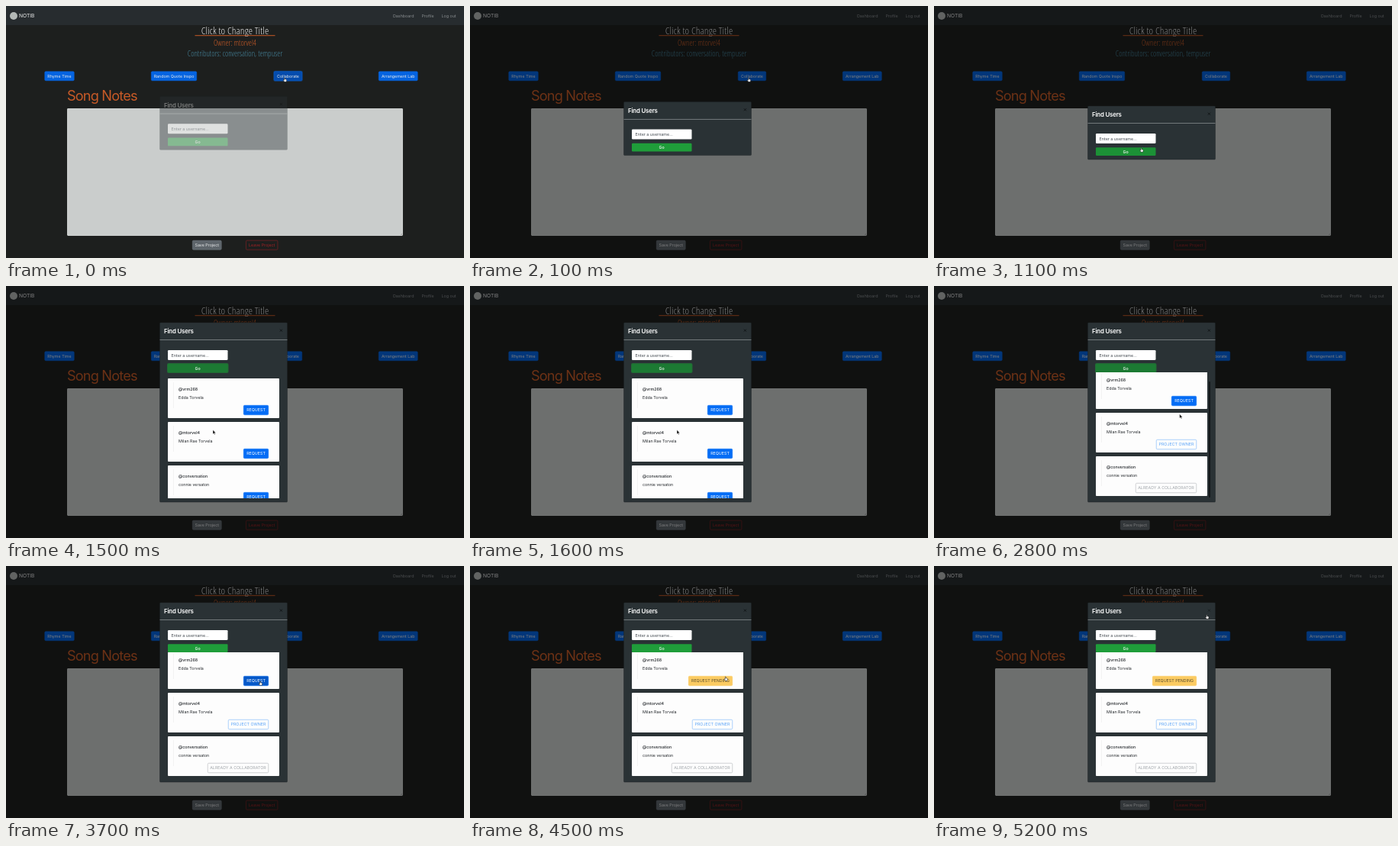
Animation of 600x330 px, one loop 5.4 s. Source, as an HTML page:

```html
<!DOCTYPE html>
<html lang="en">
<head>
<meta charset="utf-8">
<title>Find Users</title>
<style>
  html, body { margin: 0; width: 100%; height: 100%; overflow: hidden; background: #101111; }
  svg { display: block; }
  text { font-family: Inter, "Open Sans", sans-serif; white-space: pre; }
  .narrow { font-family: "Open Sans", "Noto Sans", sans-serif; font-stretch: 87.5%; font-weight: 350; }
</style>
</head>
<body>
<svg id="stage" width="600" height="330" viewBox="0 0 600 330"></svg>
<script>
const LOOP = 5400, STEP = 100;
const BLUE = '#056df5', GREEN = '#1f9d3a', PANEL = '#2a3235';

const rect = (x, y, w, h, fill, attrs = '') =>
  `<rect x="${x}" y="${y}" width="${w}" height="${h}" fill="${fill}" ${attrs}/>`;
const text = (x, y, label, fill, size = 5.34, attrs = '') =>
  `<text x="${x}" y="${y}" fill="${fill}" font-size="${size}" ${attrs}>${label}</text>`;
const centered = (x, y, label, fill, size, attrs = '') =>
  text(x, y, label, fill, size, `text-anchor="middle" ${attrs}`);
const button = (x, y, w, h, label, fill, color = '#fff', border = fill, id = '') =>
  `<g ${id && `id="${id}"`}>` +
  rect(x + .25, y + .25, w - .5, h - .5, fill, `rx="1.4" stroke="${border}" stroke-width=".5"`) +
  centered(x + w / 2, y + h / 2 + 1.95, label, color) + '</g>';

const page = () => [
  rect(0, 0, 600, 330, '#202221'),
  rect(0, 0, 600, 25, '#2a3033'),
  '<circle cx="10" cy="13" r="5" fill="#c3c8c6"/>',
  text(17, 15.3, 'NOTIB', '#fff', 6.68),
  text(507, 15, 'Dashboard', '#969a9d'),
  text(544.5, 15, 'Profile', '#969a9d'),
  text(570.5, 15, 'Log out', '#969a9d'),
  centered(300, 37.3, 'Click to Change Title', '#fff', 13.4, 'class="narrow" letter-spacing=".15"'),
  rect(247.5, 38.2, 105, 1, '#d9622a'),
  centered(300, 52, 'Owner: mtorvel4', '#d9622a', 10.4, 'class="narrow"'),
  centered(300, 66.3, 'Contributors: conversation, tempuser', '#4a8fa8', 10.4, 'class="narrow"'),
  button(50.5, 85.5, 39, 12.5, 'Rhyme Time', BLUE),
  button(190, 85.5, 60, 12.5, 'Random Quote Inspo', BLUE),
  rect(350.2, 84.7, 38.6, 14.1, '#163f70', 'rx="2.2" id="ring"'),
  button(351, 85.5, 37, 12.5, 'Collaborate', BLUE, '#fff', BLUE, 'collaborate'),
  button(488, 85.5, 51.5, 12.5, 'Arrangement Lab', BLUE),
  text(80, 124, 'Song Notes', '#d9622a', 18.2, 'letter-spacing="-.85"'),
  rect(80, 134, 440, 167, '#dcdfde', 'rx="1.4"'),
  '<path d="M517 300l2.2-2.2M518.4 300l.8-.8" stroke="#777" stroke-width=".4"/>',
  button(244, 306.8, 38.5, 12.6, 'Save Project', '#666e75', '#fff', '#7b838a'),
  button(314.2, 306.8, 42, 12.6, 'Leave Project', 'none', '#b02428', '#b02428'),
].join('');

const users = [
  ['@vrm268', 'Edda Torvela'],
  ['@mtorvel4', 'Milan Rae Torvela', 53, 'PROJECT OWNER', '#5ba5f8'],
  ['@conversation', 'connie versaton', 80, 'ALREADY A COLLABORATOR', '#a2a7ab'],
];
const card = ([handle, name, width, status, color], i) => {
  const y = 121 + 57 * i;
  return rect(212, y, 146, 52, '#fdfdfd', 'rx="1"') +
    rect(219.4, y + 5, .4, 34, '#e3e3e3') +
    text(226, y + 15.9, handle, '#212529', 5.34, 'font-weight="500"') +
    text(226, y + 27.4, name, '#212529') +
    button(311, y + 35, 33, 13, 'REQUEST', BLUE, '#fff', BLUE, 'request' + i) +
    (status
      ? `<g class="status">${button(344 - width, y + 35, width, 13, status, '#fdfdfd', color, color)}</g>`
      : button(286, y + 35, 58, 13, 'REQUEST PENDING', '#fbcb62', '#5a4d2c', '#fbcb62', 'pending'));
};

// Drawn at the expanded position; the collapsed dialog is shifted down.
const dialog = () => [
  rect(201.5, 48, 167, 235, PANEL, 'id="panel" rx="1" stroke="#1b2022" stroke-width=".4"'),
  text(207, 62.3, 'Find Users', '#fff', 7.9, 'font-weight="600" letter-spacing="-.2"'),
  '<path id="close" d="M358.9 56.7l3 3m0-3l-3 3" stroke="#0c0f10" stroke-width=".8"/>',
  rect(201.5, 70.4, 167, .6, '#a3a9ab'),
  rect(212, 84, 78.5, 13, '#fff', 'rx="1.3"'),
  text(216.5, 92.6, 'Enter a username...', '#454c52', 5.4),
  rect(211, 101, 80.5, 13, '#226a35', 'rx="2" id="goRing"'),
  rect(212, 102.2, 78.5, 10.8, GREEN, 'rx="1.2" id="go"'),
  centered(251.2, 109.5, 'Go', '#fff', 5.34, 'font-weight="500"'),
  `<svg id="results" x="201" y="113" width="168" height="165" viewBox="201 113 168 165">
    <g id="cards">${users.map(card).join('')}</g>
    ${rect(360, 125, 2, 152, '#14181a', 'rx="1" id="scrollbar"')}
  </svg>`,
].join('');

const pointers = `<g id="pointer">
  <path id="arrow" d="M0 0v5.4l1.3-1.2.9 2 .9-.4-.9-1.9h1.7z" fill="#000" stroke="#fff" stroke-width=".45"/>
  <path id="hand" d="M-.4 0q.5-.6.8 0l.2 1.8 1.8.5q.5.3.3 1l-.4 2h-2.6l-1.5-2.1q0-.7.8-.4l.5.5z"
    fill="#fff" stroke="#111" stroke-width=".5"/></g>`;

const stage = document.getElementById('stage');
stage.innerHTML = page() + rect(0, 0, 600, 330, '#000', 'id="backdrop"') +
  `<g id="dialog">${dialog()}</g>` + pointers;

const $ = id => document.getElementById(id);
const set = (id, name, value) => $(id).setAttribute(name, value);
const show = (id, on) => set(id, 'visibility', on ? 'inherit' : 'hidden');
const paint = (id, color) => { $(id).querySelector('rect').setAttribute('fill', color); };
const clamp = v => Math.max(0, Math.min(1, v));
const smooth = v => { v = clamp(v); return v * v * (3 - 2 * v); };

// time, x, y of the pointer tip
const path = [
  [0, 365, 94], [600, 365, 94], [1100, 271.5, 186], [1300, 271.5, 186], [1500, 271, 188.5],
  [2300, 271, 188.5], [2800, 321.7, 167.8], [3000, 329, 158], [3500, 333, 151],
  [4400, 333, 151], [5000, 357, 70.5], [5200, 357.3, 64],
];
const pointerAt = t => {
  const i = path.findIndex(p => p[0] > t);
  if (i < 0) return path[path.length - 1].slice(1);
  const [a, b] = [path[i - 1], path[i]];
  const k = smooth((t - a[0]) / (b[0] - a[0]));
  return [a[1] + (b[1] - a[1]) * k, a[2] + (b[2] - a[2]) * k];
};

function draw(t) {
  const drop = -16.7 * (1 - clamp((t + 45) / 300)) ** 1.7;
  const expanded = t >= 1400, loaded = t >= 1700, sent = t >= 3800;

  set('backdrop', 'opacity', clamp((t + 20) / 120) / 2);
  set('dialog', 'opacity', clamp((t + 60) / 150));
  set('dialog', 'transform', `translate(0 ${expanded ? 0 : 83 + drop})`);
  set('panel', 'height', expanded ? 235 : 70);
  show('results', expanded);

  show('ring', t < 100);
  paint('collaborate', t < 100 ? '#0553bd' : BLUE);
  const focused = t >= 1300 && t < 3700;
  show('goRing', focused);
  set('go', 'fill', focused ? '#1c7a33' : t >= 1000 && t < 1300 ? '#1c9136' : GREEN);

  set('cards', 'transform', `translate(0 ${-12 * smooth((t - 1900) / 400)})`);
  set('scrollbar', 'opacity', clamp((t - 1800) / 100) * clamp((3100 - t) / 200));
  document.querySelectorAll('.status').forEach(s =>
    s.setAttribute('visibility', loaded ? 'inherit' : 'hidden'));
  show('request0', !sent);
  show('request1', !loaded);
  show('request2', !loaded);
  show('pending', sent);
  paint('request0', t >= 3100 ? '#0558c8' : BLUE);
  set('close', 'opacity', t >= 5100 ? .6 : 1);

  const overLink = t < 700 || t >= 1000 && t < 1400 || t >= 3100 && t < 4600 || t >= 5000;
  set('pointer', 'transform', `translate(${pointerAt(t)})`);
  show('hand', overLink);
  show('arrow', !overLink);
}

const start = performance.now();
function tick() {
  const t = (performance.now() - start) % LOOP;
  draw(Math.floor(t / STEP) * STEP);
  requestAnimationFrame(tick);
}
tick();
</script>
</body>
</html>
```
